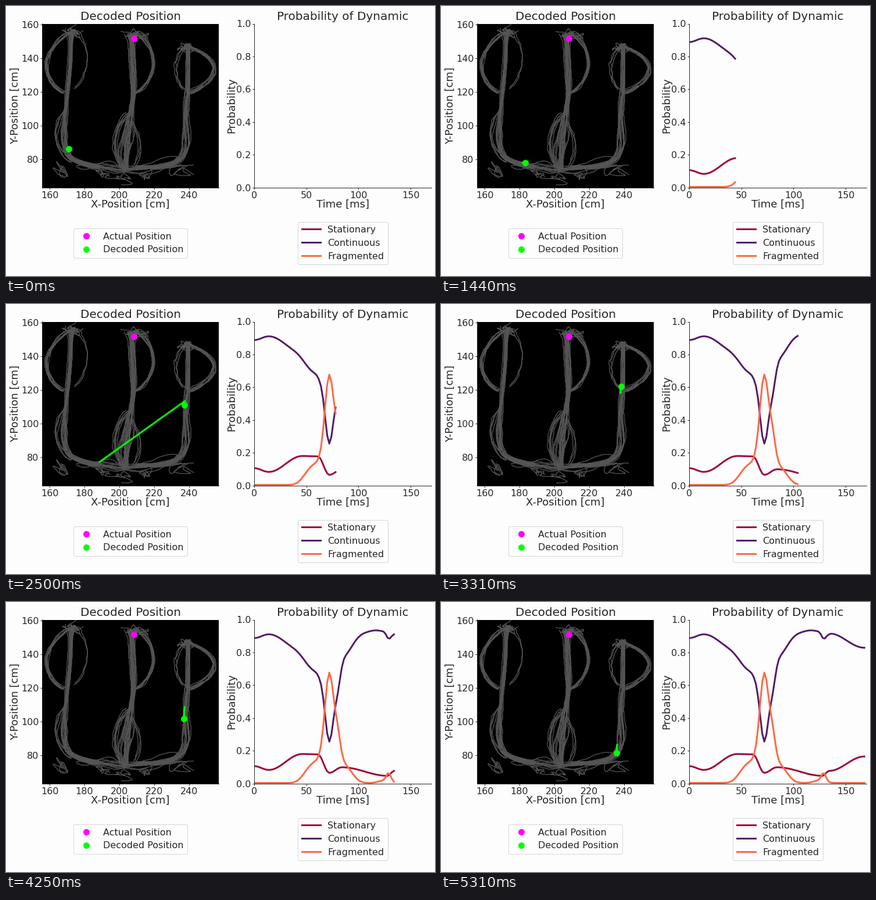
Animation, 738 px wide and 465 px high, one loop 5.37 s. Source, as a matplotlib script:

```python
import numpy as np
import matplotlib.pyplot as plt
from matplotlib.animation import FuncAnimation
from matplotlib.collections import LineCollection
from matplotlib.lines import Line2D

W, H, DPI = 738, 465, 96
PX = 72 / DPI
LOOP, FRAMES, TRAIL = 5370, 86, 5
TOP, BOTTOM = 30.5, 312.9
INK, PAPER = "#262626", "#fdfdfd"
LIME, MAGENTA = "#00ff00", "#ff00ff"
COLORS = {"Stationary": "#9f043a", "Continuous": "#521b65", "Fragmented": "#ff6944"}

plt.rcParams.update({
    "font.family": "DejaVu Sans", "text.color": INK, "axes.edgecolor": INK,
    "xtick.color": INK, "ytick.color": INK, "axes.linewidth": PX,
})
rng = np.random.default_rng(4)
fig = plt.figure(figsize=(W / DPI, H / DPI), dpi=DPI, facecolor=PAPER)


def add_axes(x0, x1, title, face, xlim, ylim):
    ax = fig.add_axes([x0 / W, 1 - BOTTOM / H, (x1 - x0) / W, (BOTTOM - TOP) / H],
                      facecolor=face)
    ax.set(xlim=xlim, ylim=ylim)
    ax.set_title(title, fontsize=20 * PX, pad=6.5 * PX)
    ax.tick_params(length=3 * PX, pad=2.7 * PX, width=PX, labelsize=16 * PX)
    ax.spines[["top", "right"]].set_visible(False)
    return ax


def label(x, y, text, rotation=0):
    fig.text(x / W, 1 - y / H, text, fontsize=18 * PX, ha="center", va="baseline",
             rotation=rotation, rotation_mode="anchor")


def legend(x, y, handles):
    leg = fig.legend(handles=handles, loc="center", bbox_to_anchor=(x / W, 1 - y / H),
                     borderaxespad=0, fontsize=16 * PX, edgecolor="#cccccc",
                     facecolor=PAPER)
    leg.get_frame().set_linewidth(PX)


def to_cm(p):
    """Convert stage pixels to maze centimetres."""
    p = np.asarray(p, float)
    return np.column_stack([160 + (p[:, 0] - 75) / 2.995, 80 + (264 - p[:, 1]) / 2.894])


def bump(t, center, width, height, power=2):
    return height * np.exp(-np.abs((t - center) / width) ** power)


lo, hi = to_cm([(62, BOTTOM), (366, TOP)])
maze = add_axes(62, 366, "Decoded Position", "black", (lo[0], hi[0]), (lo[1], hi[1]))
maze.set(xticks=range(160, 241, 20), yticks=range(80, 161, 20))
prob = add_axes(427, 732, "Probability of Dynamic", PAPER, (0, 170), (0, 1))
prob.set_xticks([0, 50, 100, 150])

label(213.5, 347, "X-Position [cm]")
label(21, 171.5, "Y-Position [cm]", 90)
label(579.5, 347, "Time [ms]")
label(393, 171.5, "Probability", 90)


# Maze: every run follows a guide line with its own slow wobble
def spline(points, m=24):
    p = np.array([points[0], *points, points[-1]], float)
    t = np.linspace(0, 1, m)[:, None]
    return np.vstack([b + t / 2 * (c - a + t * (2 * a - 5 * b + 4 * c - d
                                                + t * (3 * (b - c) + d - a)))
                      for a, b, c, d in zip(p, p[1:], p[2:], p[3:])])


def wobble(size):
    s = np.linspace(0, 2 * np.pi, size)
    w = rng.normal(0, 0.8)
    for k in range(1, 6):
        w = w + rng.normal(0, 0.6 / k) * np.sin(k * s + rng.uniform(0, 6.3))
    return w


def draw_runs(runs):
    maze.add_collection(LineCollection([to_cm(np.round(r)) for r in runs],
                                       colors="#555555", linewidths=1.3 * PX))


def bundle(n, guide, flare=0, dx=2.2, dy=2):
    """Runs spread along a guide, wider at the arm's head and foot."""
    size, y = len(guide), guide[:, 1]
    spread = dx + bump(y, 232, 35, flare) + bump(y, 45, 12, 3)
    draw_runs([guide + np.column_stack([wobble(size) * spread, wobble(size) * dy])
               for _ in range(n)])


def side_loop(n, start, end, reach):
    """Runs that leave an arm sideways and come back."""
    u = np.linspace(0, 1, 60)[:, None]
    guide = np.array(start) + u * np.subtract(end, start)
    guide = guide + reach * np.sin(np.pi * u) ** 0.7 * [1, 0]
    bundle(n, guide)


def scribble(n, x, y, sx, sy):
    draw_runs([spline(rng.normal((x, y), (sx, sy), (6, 2)), 12) for _ in range(n)])


bundle(15, spline([(112, 42), (110, 100), (103, 170), (99, 225), (112, 262), (160, 277)]), 4)
bundle(20, spline([(217, 48), (217, 95), (219, 150), (208, 235), (205, 282)]), 4.5, 3)
bundle(15, spline([(313, 66), (313, 130), (309, 190), (308, 245), (285, 273), (225, 278)]), 1.5)
bundle(11, spline([(118, 268), (160, 277), (205, 282), (255, 279), (300, 266)]), dy=4.5)

side_loop(9, (112, 46), (99, 150), -36)
side_loop(2, (118, 44), (116, 142), 21)
side_loop(4, (102, 180), (112, 268), -21)
side_loop(8, (222, 46), (224, 148), 31)
side_loop(6, (211, 185), (203, 280), -20)
side_loop(3, (218, 200), (222, 275), 11)
side_loop(8, (316, 70), (314, 148), 43)
side_loop(3, (308, 72), (308, 143), -16)

for x, y in [(113, 46), (222, 48), (311, 71)]:
    scribble(4, x, y, 10, 4)
for x, y in [(98, 284), (172, 288), (207, 296), (236, 290), (308, 283)]:
    scribble(2, x, y, 9, 7)

# Decoded path, one sample per 2 ms, with the jump between arms
step = np.arange(FRAMES - 1)
time = 2 * step
keys = [(0, 108, 246), (5, 111, 267), (8, 128, 269), (22, 145, 270), (35, 161, 272),
        (36, 308, 167), (40, 307, 176), (54, 310, 136), (67, 306, 201), (84, 302, 260)]
at, xs, ys = zip(*keys)
path = to_cm(np.column_stack([np.interp(step, at, xs), np.interp(step, at, ys)]))


def eased(t, points):
    x, y = zip(*points)
    pos = np.interp(t, x, range(len(x)))
    i = np.floor(pos)
    return np.interp(i + (1 - np.cos(np.pi * (pos - i))) / 2, range(len(y)), y)


stationary = eased(time, [(0, .107), (14, .084), (46, .181), (61, .179), (72, .066),
                          (84, .1), (128, .048), (134, .078), (168, .166)])
fragmented = (.005 + bump(time, 71, 24, .14, 4) + bump(time, 72, 6, .53)
              + bump(time, 80, 4, .13) + bump(time, 129, 3, .05)
              + bump(time, 125, 7, .016))
values = {"Stationary": stationary, "Continuous": 1 - stationary - fragmented,
          "Fragmented": fragmented}

dot = dict(marker="o", ls="none", ms=11 * PX, mew=0)
maze.plot(*to_cm([(220, 56)]).T, color=MAGENTA, zorder=5, **dot)
trail, = maze.plot([], [], color=LIME, lw=3 * PX, zorder=6)
decoded, = maze.plot([], [], color=LIME, zorder=7, **dot)
lines = {k: prob.plot([], [], color=c, lw=3 * PX)[0] for k, c in COLORS.items()}

legend(214, 408.5, [Line2D([], [], color=MAGENTA, label="Actual Position", **dot),
                    Line2D([], [], color=LIME, label="Decoded Position", **dot)])
legend(579.5, 408.5, [Line2D([], [], color=c, lw=3 * PX, label=k)
                      for k, c in COLORS.items()])


def draw(k):
    i = max(k - 1, 0)
    trail.set_data(*path[max(0, i - TRAIL + 1):i + 1].T)
    decoded.set_data(*path[i:i + 1].T)
    for name, line in lines.items():
        line.set_data(time[:k], values[name][:k])
    return [trail, decoded, *lines.values()]


anim = FuncAnimation(fig, draw, frames=FRAMES, interval=LOOP / FRAMES,
                     repeat=True, repeat_delay=0)
plt.show()
```
